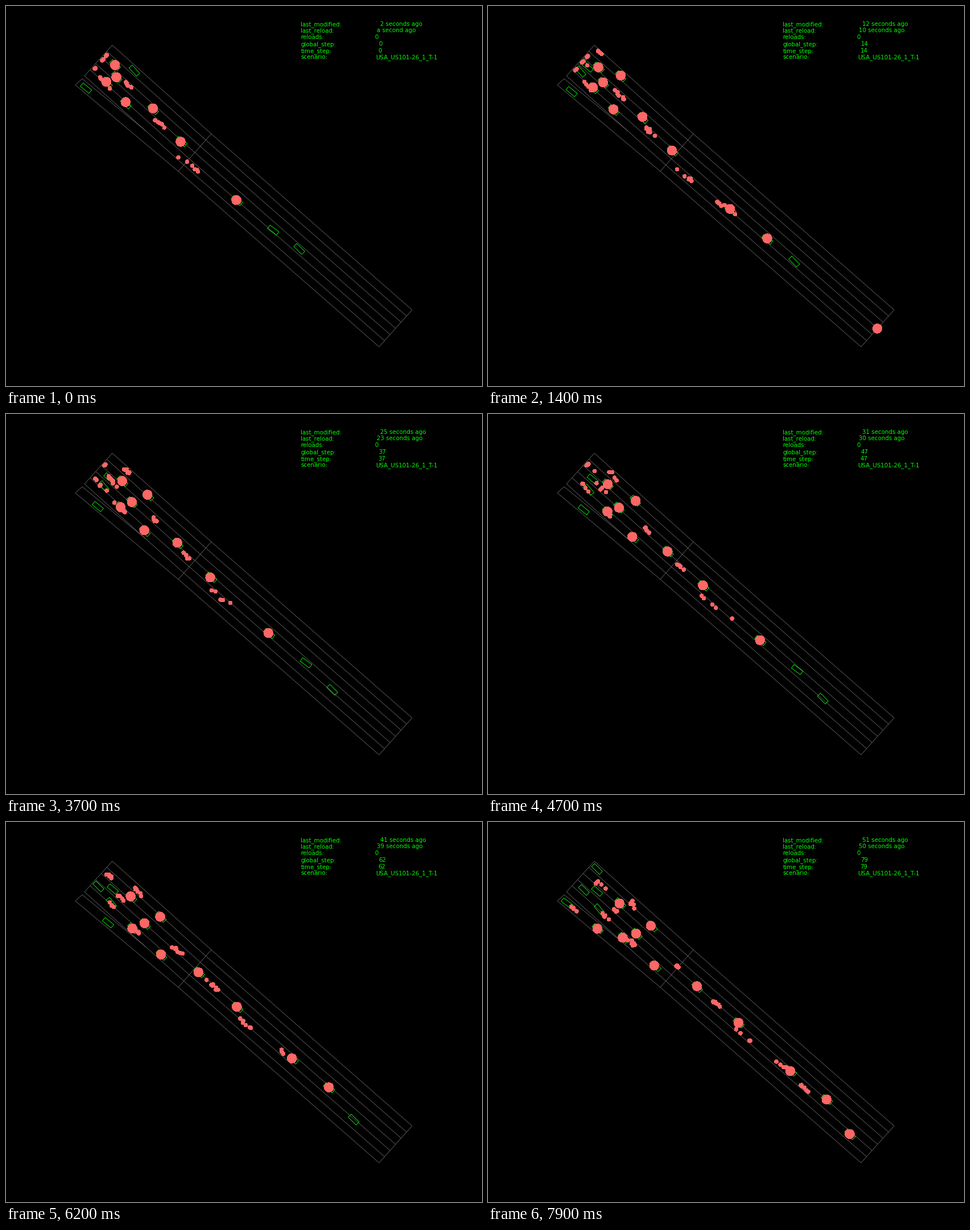
A matplotlib script that plays this animation: 837x669 px, repeating every 8000 ms.

```python
import numpy as np
import matplotlib.pyplot as plt
from matplotlib.animation import FuncAnimation
from matplotlib.collections import LineCollection, PolyCollection

W, H, DPI = 837, 669, 64
PX = 72 / DPI
FRAMES, INTERVAL = 80, 100
GREEN, RED, GREY = "#00ff00", "#ff6666", "#707070"
BIG, SMALL = 16.4, 6.6
CORNER, ROAD = np.array([187, 69]), np.array([0.749, 0.662])


def blink(i, start, period=FRAMES, width=FRAMES):
    return i >= start and (i - start) % period < width


class Car:
    """Drives from a to b; detections cluster at a fixed gap behind it."""

    def __init__(self, a, b, ease=1.22, enter=0, gap=54, seen=(0,)):
        self.a, self.d = np.array(a), np.subtract(b, a)
        self.power = np.array([ease, 1 + 0.6 * (ease - 1)])
        self.enter, self.gap, self.seen = enter, gap, seen
        self.u = self.d / np.hypot(*self.d)
        self.v = np.array([-self.u[1], self.u[0]])

    def pos(self, i):
        t = (i - self.enter) / (FRAMES - 1 - self.enter)
        return self.a + self.d * t ** self.power

    def box(self, i):
        c = self.pos(i) + self.u
        return [c + 9.8 * s * self.u + 3.8 * t * self.v
                for s, t in ((-1, -1), (1, -1), (1, 1), (-1, 1))]

    def dots(self, i, rng):
        n = rng.integers(4, 8)
        c = self.pos(i)
        room = max((c - CORNER) @ ROAD - 4, 8)
        back = np.clip(self.gap + rng.normal(0, self.gap / 8, n), 8, room)
        side = rng.normal(0, 1.5, n)
        small = [(*(c - s * self.u + t * self.v), SMALL) for s, t in zip(back, side)]
        return small + [(*(c + rng.normal(0, 0.7, 2)), BIG)]


tracked = [
    Car((515, 427), (636, 549), 0.97, gap=112, seen=(74,)),
    Car((469, 394), (595, 488), 1.03, gap=104, seen=(8, 54, 22)),
    Car((405, 342), (532, 438), 1.06, gap=102),
    Car((308, 238), (440, 353)),
    Car((258, 181), (367, 290)),
    Car((210, 171), (294, 253)),
    Car((194, 124), (261, 196)),
    Car((177, 134), (238, 203)),
    Car((191, 103), (232, 142), 1.5),
    Car((225, 113), (288, 183), seen=(4,)),
    Car((140, 144), (192, 187), seen=(20, 53, 14)),
]
entering = [
    Car((160, 111), (195, 153), 1.35, enter=4),
    Car((171, 104), (191, 121), 0.85, enter=4),
    Car((160, 111), (168, 119), 1, enter=57),
    Car((188, 79), (191, 82), 1, enter=73),
    Car((134, 139), (138, 142), 1, enter=73),
]


def detections(i):
    rng = np.random.default_rng(500 + i)
    dots = []
    for car in tracked:
        if blink(i, *car.seen):
            dots += car.dots(i, rng)
    if blink(i, 11, 42, 8):  # a car leaving at the far end
        dots.append((*rng.normal((684, 569), 1), BIG))
    return np.array(dots)


def road_lines():
    first = np.linspace((187, 69), (138, 123), 6)
    middle = np.linspace((361, 225), (303, 291), 7)
    last = np.linspace((714, 535), (656, 600), 7)
    lines = [*zip(first, middle), *zip(middle, last)]
    lines += [(s[0], s[-1]) for s in (first, middle, last)]
    ramp, outer = (134, 128), (122, 139)
    return lines + [(ramp, outer), (outer, middle[-1]), (ramp, (246, 220))]


def ago(seconds):
    n = int(seconds)
    return "a second ago" if n == 1 else f"{n} seconds ago"


def status(i):
    t = np.interp(i, [0, 14, 37, 79], [2.6, 12.1, 25.2, 51.9])
    return ago(t), ago(t - 1.25), "0", str(i), str(i), "USA_US101-26_1_T-1"


fig = plt.figure(figsize=(W / DPI, H / DPI), dpi=DPI, facecolor="black")
ax = fig.add_axes([0, 0, 1, 1])
ax.set_xlim(0, W)
ax.set_ylim(H, 0)
ax.axis("off")

ax.add_collection(LineCollection(road_lines(), colors=GREY, linewidths=0.7 * PX))
boxes = PolyCollection([], facecolors="none", edgecolors=GREEN,
                       linewidths=0.85 * PX, zorder=3)
ax.add_collection(boxes)
dots = ax.scatter([], [], c=RED, linewidths=0, antialiaseds=False, zorder=4)

values = []
labels = ["last_modified", "last_reload", "reloads", "global_step", "time_step", "scenario"]
style = dict(color=GREEN, family="DejaVu Sans", size=10.2 * PX, va="baseline")
for k, (label, x) in enumerate(zip(labels, (659, 653, 649, 656, 655, 651))):
    y = 34.8 + 11.7 * k
    ax.text(518.5, y, label + ":", **style)
    values.append(ax.text(x - 0.5, y, "", **style))


def update(i):
    boxes.set_verts([c.box(i) for c in tracked + entering if i >= c.enter])
    found = detections(i)
    dots.set_offsets(found[:, :2])
    dots.set_sizes((found[:, 2] * PX) ** 2)
    for text, s in zip(values, status(i)):
        text.set_text(s)
    return [boxes, dots, *values]


anim = FuncAnimation(fig, update, frames=FRAMES, interval=INTERVAL,
                     repeat=True, repeat_delay=0, blit=False)
plt.show()
```
